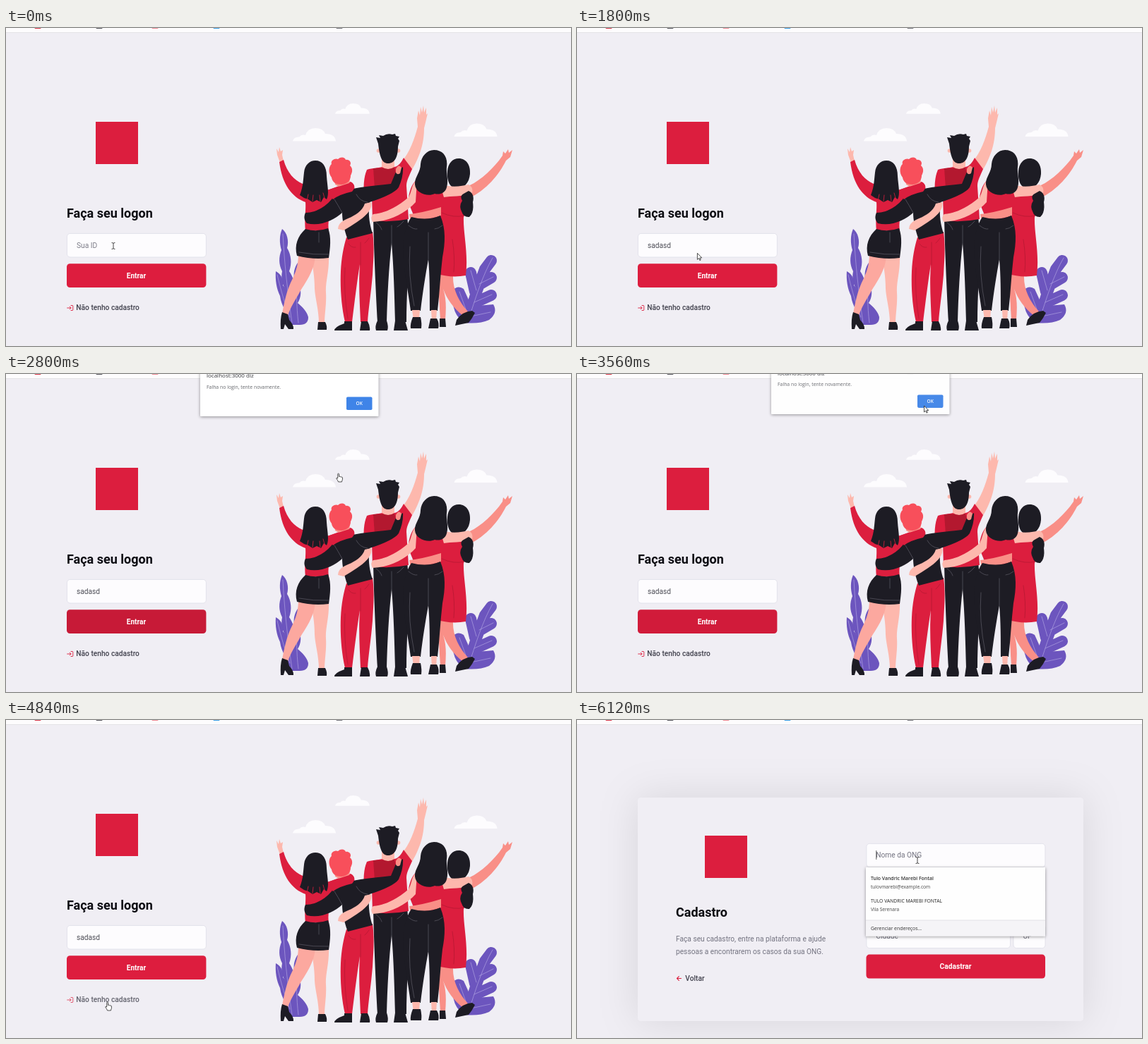
These frames come from a looping animation (800 px wide and 451 px high, 6.16 s). An HTML page:

```html
<!DOCTYPE html>
<html lang="pt-BR">
<head>
<meta charset="utf-8">
<title>Logon</title>
<style>
html, body { margin: 0; width: 100%; height: 100%; overflow: hidden; background: #f0eef4; }
svg { display: block; width: 100%; height: 100%; }
text { font: 400 10.2px Roboto, sans-serif; fill: #737380; }
.h1 { font-size: 18px; font-weight: 700; fill: #0c0c12; }
.btn { font-weight: 700; fill: #fff; text-anchor: middle; }
.link { font-weight: 500; fill: #41414d; }
.field { fill: #fdfcfe; stroke: #dedde8; stroke-width: .8; }
.ui { font-family: "Open Sans", "Noto Sans", sans-serif; font-size: 6.9px; fill: #66686d; }
.line { fill: none; stroke-linecap: round; stroke-linejoin: round; }
.red { fill: #dc1e3e; }
.ink { fill: #1d1c24; }
.skin { fill: #fdb8ad; }
.rose { fill: #f98f87; }
.leaf { fill: #6c55be; }
#card { filter: drop-shadow(0 0 28px rgba(0, 0, 0, .1)); }
#menu > .panel, #alert > .panel { filter: drop-shadow(0 1px 2px rgba(0, 0, 0, .4)); }
</style>
</head>
<body>
<svg viewBox="0 0 800 451" preserveAspectRatio="none">
  <defs>
    <path id="cloud" fill="#fdfcfe" d="M0 18.5Q1 12.5 9 12.5Q13 8 18 10Q21 0 32 0Q43 0 46 8Q60 8 61 18.5Z"/>
  </defs>
  <rect width="800" height="451" fill="#f0eef4"/>

  <g id="logon">
    <rect class="red" x="127" y="133" width="60" height="60"/>
    <text class="h1" x="86" y="269">Faça seu logon</text>
    <rect class="field" x="86.4" y="291.4" width="197" height="33.6" rx="4.5"/>
    <text id="value" x="100" y="312"></text>
    <path id="caret" class="line" stroke="#333" stroke-width=".8"/>
    <rect id="enter" x="86" y="334.3" width="197.4" height="33.7" rx="4.5"/>
    <text class="btn" x="184.5" y="355">Entrar</text>
    <g id="signup">
      <path class="line" stroke="#dc1e3e" stroke-width=".9" d="M92 393.500h2q.8 0 .8.8v5.400q0 .8-.8.8H92M90.200 395.200l1.900 1.800L90.200 398.800M86.700 397h5.200"/>
      <text class="link" x="99.3" y="400.3">Não tenho cadastro</text>
    </g>

    <use href="#cloud" x="406" y="142"/>
    <use href="#cloud" transform="translate(466 107) scale(.8)"/>
    <use href="#cloud" x="634.5" y="135.5"/>

    <g class="leaf">
      <path d="M391 285C398 290 401 302 398 312C404 322 405 334 401 345C407 354 409 362 407 372C414 382 412 400 410 420L400 420C398 400 396 385 397 372C391 365 389 355 391 345C386 335 386 325 390 315C387 305 387 294 391 285Z"/>
      <path d="M413 333C419 343 419 352 414 362C419 372 418 382 413 390C420 396 426 402 428 410Q428 421 416 421L402 421C398 405 400 395 405 385C402 375 404 365 409 358C406 350 408 340 413 333Z"/>
      <path d="M382 345C390 349 393 357 392 365C399 372 402 380 402 392L404 412C398 405 390 395 388 380C383 370 381 357 382 345Z"/>
      <path d="M632 372Q640 364 648 370L658 392L667 394L690 392Q697 404 684 414Q670 420 650 418Q630 408 632 372Z"/>
    </g>
    <path class="line" stroke="#6c55be" stroke-width="16" d="M656 408L667 372L678 342L687 330M663 390L687 379M670 364L687 354M664 374L658 347"/>
    <path class="line" stroke="#b9aee6" stroke-width=".6" d="M392 292C394 330 398 370 405 418M413 340C411 370 411 395 414 418M384 350C390 375 396 395 402 410M689 326C675 350 664 385 654 417M690 353l-20 10M688 378l-25 11M642 374l13 36M658 344l8 28M686 403l-28 6"/>

    <!-- right woman -->
    <path class="rose" d="M650 226C667 220 684 205 698 188L703 181L704 175L707 178L711 172L712 177L717 173L714 183L708 188C698 208 680 230 656 241ZM613 348L633 350C632 370 641 388 654 402L647 408C634 398 624 384 619 370C624 385 623 400 622 414L615 414C614 395 612 375 613 348Z"/>
    <path class="ink" d="M638 414Q646 402 660 401L664 404Q660 412 655 418Q645 420 636 422ZM614 412h8l1 12h-9Z"/>
    <path class="red" d="M618 232L655 230C660 240 655 255 648 268C647 290 655 320 651 351Q630 355 608 348C614 325 620 300 612 268Z"/>
    <path class="line" stroke="#a91730" stroke-width=".6" d="M617 262Q634 270 649 266M632 300q4 25 2 46"/>
    <path class="ink" d="M641 185C652 185 658 195 657 207C656 220 648 227 640 228C628 228 624 216 625 203C626 192 632 185 641 185Z"/>

    <!-- tall man -->
    <path class="skin" d="M560 190C572 176 578 158 583 140L582 128L584 117L586 124L587 112L589 120L591 110L592 120L595 113L595 123L597 121L594 134L592 142C592 160 588 180 573 204L560 212Z"/>
    <path class="ink" d="M520 268L568 266L571 300C570 340 567 380 567 417L551 417C550 380 549 340 546 305C542 340 540 380 539 417L526 417C524 380 521 320 520 268ZM526 415h13q3 9 1 14h-16q-2-6 2-14ZM551 415h14l4 14h-20Z"/>
    <path class="red" d="M511 201C520 198 526 199 533 197L550 197C556 196 560 190 563 184L575 200C571 210 567 216 567 224L570 271Q545 276 519 273L518 238L507 238Q505 215 511 201Z"/>
    <path fill="#b3182f" d="M520 199L550 198L553 212L546 222L522 227Z"/>
    <path class="skin" d="M532 184h18v13q-9 6-18 0Z"/>
    <circle class="skin" cx="527.500" cy="174" r="2.800"/>
    <circle class="skin" cx="555.500" cy="174" r="2.800"/>
    <path class="ink" d="M527 164L524 155L530 156L528 152L534 153Q540 149 547 151L551 150L552 153L557 154L555 157L557 160L555 168C555 182 551 192 541 192C532 192 529 182 527 164Z"/>
    <path class="line" stroke="#777580" stroke-width=".5" d="M546 306V280M524 276q6 4 8 10M563 274q-5 6-9 8"/>

    <!-- left woman -->
    <path class="skin" d="M388 191L384 180L383 171L386 176L387 169L389 175L392 173L391 180L393 189ZM432 322H457C458 345 452 360 453 375C454 392 451 405 451 419H443C443 400 438 385 437 370C437 350 434 340 432 322Z"/>
    <path fill="#fca89f" d="M414 320L438 322C437 345 424 360 414 378C407 390 402 398 399 408L391 405C394 390 397 372 406 355C411 344 414 335 414 320Z"/>
    <path class="ink" d="M391 403L399 406L401 414Q408 422 407 427L400 427L395 420L393 427L389 427Q388 412 391 403ZM442 417h10q3 6 2 11h-13Z"/>
    <path class="red" d="M387 190L393 187C398 205 408 216 420 221L455 230L488 218Q496 222 492 234L466 246C458 262 455 275 457 287L424 288C422 272 425 258 424 247C405 240 391 222 387 190Z"/>
    <path class="ink" d="M424 285Q440 290 456 284C461 297 459 312 457 326Q435 329 412 323C408 308 413 295 424 285Z"/>
    <path class="line" stroke="#777580" stroke-width=".5" d="M415 318q20 4 41 3M443 290v14"/>

    <!-- curly friend -->
    <path class="red" d="M482 297L519 289C522 310 520 330 519 350C517 375 513 400 512 417L502 417C501 390 499 365 501 335C497 360 494 385 490 417L480 417C475 395 473 370 474 345C475 325 478 310 482 297Z"/>
    <path class="line" stroke="#a91730" stroke-width=".6" d="M502 336V304M485 306q4 6 10 5M514 298q-4 6-6 7M480 340q-2 35 4 72"/>
    <path class="ink" d="M479 416L490 416L490 429L465 429Q465 424 479 419ZM503 416h9q4 7 3 13h-14Z"/>
    <path class="rose" d="M464 205H488L486 222Q478 230 466 222Z"/>
    <path fill="#f84f5b" d="M461 212C455 204 458 195 461 193C459 187 467 184 470 186C474 182 480 183 481 187C486 186 490 191 487 195C492 199 490 206 488 209C488 216 484 221 475 222C466 222 462 218 461 212Z"/>
    <path class="ink" d="M465 238C480 228 500 226 545 221L552 204L562 197Q563 210 556 226Q549 236 515 247C512 262 515 280 519 291L484 300C478 285 476 270 476 262C465 272 445 282 426 277Q420 270 424 262C440 262 455 252 465 238Z"/>
    <path class="red" d="M452 231L489 219Q497 224 490 232Q472 236 463 243Z"/>
    <path class="rose" d="M552 200Q556 192 560 198L558 206Q554 209 552 205Z"/>
    <path class="line" stroke="#777580" stroke-width=".5" d="M496 236q5 10 16 11M465 243q5 8 11 19"/>
    <path class="skin" d="M508 249L517 247C520 260 505 271 478 287L470 285Q470 277 480 272C495 266 505 259 508 249Z"/>
    <path class="ink" d="M438 188C448 188 454 196 454 210C455 225 458 235 454 243L450 240L446 247L440 244L434 247L428 243L422 241L416 237C421 225 421 212 422 205C423 194 430 188 438 188Z"/>
    <path class="line" stroke="#dc1e3e" stroke-width=".8" d="M428 236l-2 9M435 237l-1 9M444 237l1 9M449 234l2 7"/>

    <!-- front woman -->
    <path class="red" d="M584 214L618 212C625 222 626 240 622 250C616 258 613 266 616 272L578 272C578 262 570 255 570 240C572 228 576 218 584 214Z"/>
    <path class="skin" d="M582 216C574 220 575 232 570 240C556 252 540 262 520 264Q515 268 519 275C545 274 566 262 580 247ZM614 220C630 228 645 224 655 222Q662 226 660 234C645 240 630 238 620 240Z"/>
    <path class="rose" d="M571 264Q590 262 616 254L616 266Q594 274 572 270Z"/>
    <path class="ink" d="M574 268Q596 274 615 266C623 285 622 305 618 325C615 350 614 375 611 401L600 401C600 375 600 350 598 328C594 350 590 375 587 401L573 401C569 370 563 345 562 315C562 295 567 278 574 268Z"/>
    <path class="skin" d="M575 400h11l-1 13h-8ZM602 400h8l-1 16h-6Z"/>
    <path class="ink" d="M576 410h11q2 9 1 16h-15q-1-6 3-16ZM601 412h9q4 7 2 14h-14Z"/>
    <path class="line" stroke="#777580" stroke-width=".5" d="M598 328V290M570 280q7 6 12 5M618 280q-6 5-11 5M572 310q-3 40 6 84"/>
    <path class="ink" d="M606 173C619 173 626 183 624 197C623 206 627 216 624 226C622 234 614 237 607 235C597 240 580 234 579 222C578 212 587 205 587 193C588 182 596 173 606 173ZM655 231Q664 235 661 247Q663 262 656 268Q648 269 645 260Q641 252 646 245Q642 238 648 235Z"/>
  </g>

  <g id="register">
    <rect id="card" x="86" y="110" width="631" height="317" rx="4.5" fill="#f0eef4"/>
    <rect class="red" x="181" y="164" width="60" height="60"/>
    <text class="h1" x="140" y="279">Cadastro</text>
    <text x="140" y="314">Faça seu cadastro, entre na plataforma e ajude</text>
    <text x="140" y="332">pessoas a encontrarem os casos da sua ONG.</text>
    <path class="line" stroke="#dc1e3e" stroke-width="1.1" d="M147.500 366.500H141.500M144.300 363.700L141.500 366.500L144.300 369.300"/>
    <text class="link" x="153.300" y="370">Voltar</text>
    <g id="fields"></g>
    <rect class="red" x="409.500" y="332.600" width="253.500" height="34" rx="4.500"/>
    <text class="btn" x="536" y="353">Cadastrar</text>
    <path id="caret2" class="line" stroke="#333" stroke-width=".8" d="M423.800 185.500v12"/>
    <g id="menu">
      <rect class="panel" x="409" y="209" width="254" height="97.500" fill="#fefefe"/>
      <path fill="#f5f4f7" d="M409 284h254v22.500h-254z"/>
      <path stroke="#dcdbe0" stroke-width=".8" d="M409 284h254"/>
      <text class="ui" style="font-weight:600;fill:#333" x="416" y="226.500">Tulo Vandric Marebi Fontal</text>
      <text class="ui" style="font-size:6.600px;fill:#444" x="416" y="238.500">tulovmarebi@example.com</text>
      <text class="ui" style="font-size:6.800px;fill:#222" x="416" y="259.300">TULO VANDRIC MAREBI FONTAL</text>
      <text class="ui" style="font-size:6.600px;fill:#444" x="416" y="271.300">Vila Serenara</text>
      <text class="ui" style="fill:#333" x="416" y="298.300">Gerenciar endereços...</text>
    </g>
  </g>

  <rect width="800" height="6" fill="#fdfcfd"/>
  <path stroke="#e3e2e6" d="M0 6.500h800"/>
  <g id="tabs"></g>

  <g id="alert">
    <rect class="panel" x="275" y="-12" width="252.500" height="72" rx="1" fill="#fff"/>
    <text class="ui" style="font-size:8px;fill:#35363a" x="284" y="5">localhost:3000 diz</text>
    <text class="ui" x="284" y="20.500">Falha no login, tente novamente.</text>
    <rect x="482" y="32.500" width="36.500" height="18.500" rx="1.800" fill="#3f84e8"/>
    <text class="ui" style="font-weight:600;font-size:6.500px;fill:#fff;text-anchor:middle" x="500.200" y="44">OK</text>
  </g>

  <g id="cursor" stroke-linejoin="round">
    <path id="beam" class="line" stroke="#333" stroke-width=".9" d="M-2-4.500Q0-4.500 0-3.500Q0-4.500 2-4.500M0-3.500V3.500M-2 4.500Q0 4.500 0 3.500Q0 4.500 2 4.500"/>
    <path id="arrow" fill="#fff" stroke="#222" stroke-width=".8" d="M-2.500-5V4L-.400 2.100L1 5.200L2.300 4.600L1 1.600H3.800Z"/>
    <path id="hand" fill="#fff" stroke="#222" stroke-width=".8" d="M-2.300-5.300Q-1.300-6.500-.500-5.300V-1.400Q.500-2.300 1.200-1.200Q2.200-1.900 2.800-.800Q4-1.300 4.400 0V2.800Q3.800 4.200 3.400 6H-1.400Q-2.300 3.600-4.400 1Q-4.200-.300-2.300 1Z"/>
  </g>
</svg>
<script>
const LOOP = 6160;
const PLACEHOLDER = 'Sua ID', TYPED = 'sadasd';
const PAGE_AT = 4960, MENU_AT = 5960;
const $ = id => document.getElementById(id);
const clamp = v => Math.min(1, Math.max(0, v));
const ramp = (t, start, length) => clamp((t - start) / length);
const show = (id, on) => $(id).setAttribute('display', on ? 'inline' : 'none');

// time, x, y of the pointer's centre
const track = [
  [0, 152, 309], [120, 152, 309], [640, 160, 304], [1080, 162, 302], [1660, 162, 303],
  [1960, 186, 350], [2200, 190, 352], [2500, 190, 352], [2800, 472, 147], [3060, 497, 47],
  [3400, 494, 50], [3640, 494, 50], [3960, 381, 184], [4520, 147, 408], [4760, 145, 406],
  [5000, 145, 406], [5280, 168, 430], [5440, 190, 438], [5840, 428, 192], [6100, 482, 199], [LOOP, 482, 199]
];
// time at which each pointer shape begins
const shapes = [[0, 'beam'], [1800, 'arrow'], [1880, 'hand'], [3000, 'arrow'],
  [4440, 'hand'], [5040, 'arrow'], [5800, 'beam']];

function pointer(t) {
  const i = track.findIndex(k => k[0] > t);
  const [t0, x0, y0] = track[i - 1], [t1, x1, y1] = track[i];
  const p = (t - t0) / (t1 - t0), e = p * p * (3 - 2 * p);
  return [x0 + (x1 - x0) * e, y0 + (y1 - y0) * e];
}

$('fields').innerHTML = [
  [409.9, 0, 253, 'Nome da ONG'], [409.9, 1, 253, 'E-mail'], [409.9, 2, 253, 'Telefone'],
  [409.9, 3, 203.6, 'Cidade'], [618, 3, 45, 'UF']
].map(([x, row, w, label]) => {
  const y = 175.3 + row * 38.3;
  return `<rect class="field" x="${x}" y="${y}" width="${w}" height="33.4" rx="4.5"/>
    <text x="${x + 13.4}" y="${y + 20}">${label}</text>`;
}).join('');

$('tabs').innerHTML = [[45, '#d8384a'], [132, '#55555c'], [211, '#f08a94'], [298, '#3aa0e8'], [472, '#77777e']]
  .map(([x, c]) => `<rect x="${x - 4.5}" y="-7" width="9" height="8" rx="1" fill="${c}"/>`).join('');

function render(t) {
  const second = t >= PAGE_AT;
  show('logon', !second);
  show('register', second);

  const typed = t < 1280 ? 0 : Math.min(TYPED.length, 1 + Math.floor((t - 1280) / 60));
  $('value').textContent = typed ? TYPED.slice(0, typed) : PLACEHOLDER;
  $('value').style.fill = typed ? '#4c4c55' : '#7d7d88';
  const caretX = 100 + (typed ? $('value').getComputedTextLength() + .6 : 0);
  $('caret').setAttribute('d', `M${caretX} 302.500v12`);
  show('caret', !second && t >= 1140 && t < 1720);

  const dark = ramp(t, 1880, 200) - ramp(t, 3480, 180);
  const mix = (a, b) => Math.round(a + (b - a) * dark);
  $('enter').setAttribute('fill', `rgb(${mix(221, 199)},${mix(29, 26)},${mix(62, 55)})`);
  $('signup').setAttribute('opacity', 1 - .2 * ramp(t, 4440, 200));

  const open = ramp(t, 2280, 120), close = ramp(t, 3530, 140);
  show('alert', open > 0 && close < 1);
  $('alert').setAttribute('opacity', open * (1 - close * close));
  $('alert').setAttribute('transform', `translate(0 ${-14 * (1 - open + close)})`);

  show('caret2', t >= 5880);
  show('menu', t >= MENU_AT);

  const shape = shapes.filter(s => s[0] <= t).pop()[1];
  for (const id of ['beam', 'arrow', 'hand']) show(id, id === shape);
  $('cursor').setAttribute('transform', `translate(${pointer(t)})`);
}

const start = performance.now();
function tick() {
  render((performance.now() - start) % LOOP);
  requestAnimationFrame(tick);
}
tick();
</script>
</body>
</html>
```
